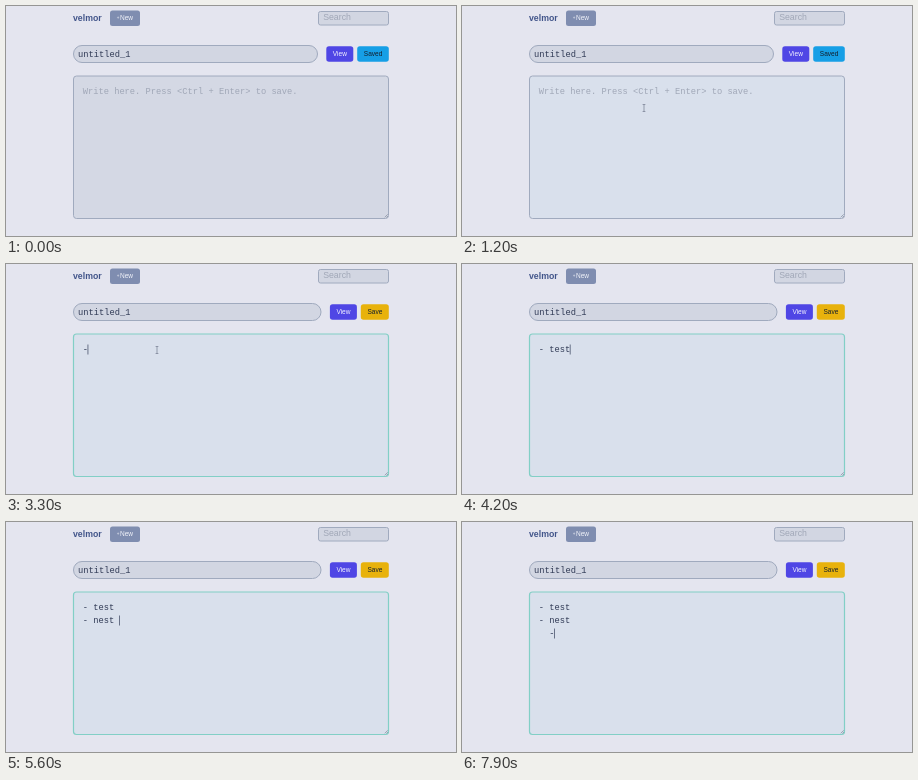
An HTML page for the animation above (8 s loop, 450 px wide and 230 px high).

```html
<!DOCTYPE html>
<html lang="en">
<head>
<meta charset="utf-8">
<title>Note editor</title>
<style>
  html, body { margin: 0; width: 100%; height: 100%; overflow: hidden; background: #e4e5ef; }
  svg { display: block; width: 450px; height: 230px; }
  text { white-space: pre; font-family: "Liberation Sans", Arial, sans-serif; font-size: 8.74px; }
  .mono { font-family: "Liberation Mono", "Courier New", monospace; }
  .small { font-size: 6.55px; }
  .hint { fill: #a0a7b7; }
  .ink { fill: #303a55; }
  .field { fill: #d2d6e2; stroke: #a0aabe; }
</style>
</head>
<body>
<svg viewBox="0 0 450 230">
  <text x="67" y="15" font-weight="bold" fill="#42558a">velmor</text>
  <rect x="104" y="4.5" width="30" height="15.5" rx="2.5" fill="#7f8db0"/>
  <text x="110.8" y="13.4" fill="#f2f4fa" style="font-size:4.5px">+</text>
  <text class="small" x="114" y="14" fill="#f2f4fa">New</text>
  <rect class="field" x="312.5" y="5.5" width="70" height="13.5" rx="2"/>
  <text class="hint" x="317.2" y="14.2">Search</text>

  <rect id="name" class="field" x="67.5" y="39.5" width="244" height="17" rx="8.5"/>
  <text class="mono ink" x="72" y="50.6">untitled_1</text>
  <g id="view">
    <rect x="320.3" y="40.3" width="27" height="15.4" rx="2.7" fill="#4f46e5"/>
    <text class="small" x="326.8" y="49.8" fill="#f4f4ff">View</text>
  </g>
  <rect id="saveBox" y="40.3" height="15.4" rx="2.7"/>
  <text id="saveText" class="small" y="49.8" fill="#14202e"></text>

  <rect id="area" x="67.5" y="70" width="315" height="142.5" rx="3"/>
  <path d="M378.8 211.3L381.8 208.3M380.6 211.5L382 210.1" stroke="#6d7688" stroke-width=".6"/>
  <text id="hint" class="mono hint" x="76.7" y="88">Write here. Press &lt;Ctrl + Enter&gt; to save.</text>
  <text class="mono ink row" x="76.7" y="88"></text>
  <text class="mono ink row" x="76.7" y="101"></text>
  <text class="mono ink row" x="76.7" y="114"></text>
  <rect id="caret" width=".8" height="10" fill="#4c556e"/>
  <path id="mouse" d="M-1.4 -3.5H1.4M-1.4 3.5H1.4M0 -3.5V3.5" fill="none" stroke="#747c90" stroke-width=".7"/>
</svg>
<script>
const LOOP = 8000, STEP = 100, CHAR = 5.244, LINE = 13;
const CLICK = 2100, TYPING = 3300;
const $ = id => document.getElementById(id);
const rows = [...document.querySelectorAll('.row')];

// Each key press: time and typed text ('<' deletes one character).
const keys = [
  [3300, '-'], [3400, ' '], [3600, 't'], [3700, 'e'], [3800, 's'], [3900, 't'],
  [4500, '\n'], [4600, '- '],
  [5100, 'n'], [5200, 'e'], [5300, 's'], [5500, 't'], [5600, ' '],
  [6200, '<'], [6300, '\n'], [6500, ' '], [6600, ' '], [7900, '-']
];
const caretOff = [[0, CLICK], [2700, 3300], [7100, 7700]];
const path = [[800, 300, 206], [1200, 182, 102], [1500, 151, 86]];

const clamp = v => Math.max(0, Math.min(1, v));
const set = (el, attrs) => { for (const k in attrs) el.setAttribute(k, attrs[k]); };
const show = (el, on) => set(el, { visibility: on ? 'visible' : 'hidden' });

function mix(a, b, p) {
  return `rgb(${a.map((v, i) => Math.round(v + (b[i] - v) * p))})`;
}

function typed(t) {
  let s = '';
  for (const [at, k] of keys) {
    if (at > t) break;
    s = k === '<' ? s.slice(0, -1) : s + k;
  }
  return s.split('\n');
}

function mouseAt(t) {
  let [, x, y] = path[0];
  for (let i = 1; i < path.length; i++) {
    const [t0, x0, y0] = path[i - 1], [t1, x1, y1] = path[i];
    if (t < t0) break;
    const p = clamp((t - t0) / (t1 - t0));
    x = x0 + (x1 - x0) * p;
    y = y0 + (y1 - y0) * p;
  }
  return `translate(${x} ${y})`;
}

function draw(t) {
  const dirty = t >= TYPING;
  const focus = clamp((t - CLICK) / 200);
  const hover = clamp((t - 800) / 200);
  set($('area'), {
    fill: mix([212, 216, 228], [217, 224, 236], hover),
    stroke: mix([160, 170, 190], [130, 207, 198], focus),
    'stroke-width': 1 + focus * 0.2
  });

  set($('name'), { width: dirty ? 247.5 : 244 });
  set($('view'), { transform: `translate(${dirty ? 3.6 : 0} 0)` });
  set($('saveBox'), dirty
    ? { x: 354.8, width: 28, fill: '#e8b20c' }
    : { x: 351.2, width: 31.6, fill: '#169fe6' });
  set($('saveText'), { x: dirty ? 361.4 : 357.8 });
  $('saveText').textContent = dirty ? 'Save' : 'Saved';

  const lines = typed(t), last = lines.length - 1;
  rows.forEach((row, i) => row.textContent = lines[i] || '');
  show($('hint'), !dirty);
  set($('caret'), { x: 76.3 + lines[last].length * CHAR, y: 80.5 + last * LINE });
  show($('caret'), !caretOff.some(([a, b]) => t >= a && t < b));

  set($('mouse'), { transform: mouseAt(t) });
  show($('mouse'), t >= 800 && t < 3400);
}

const start = performance.now();
function tick() {
  const t = (performance.now() - start) % LOOP;
  draw(Math.floor(t / STEP) * STEP);
  requestAnimationFrame(tick);
}
tick();
</script>
</body>
</html>
```
